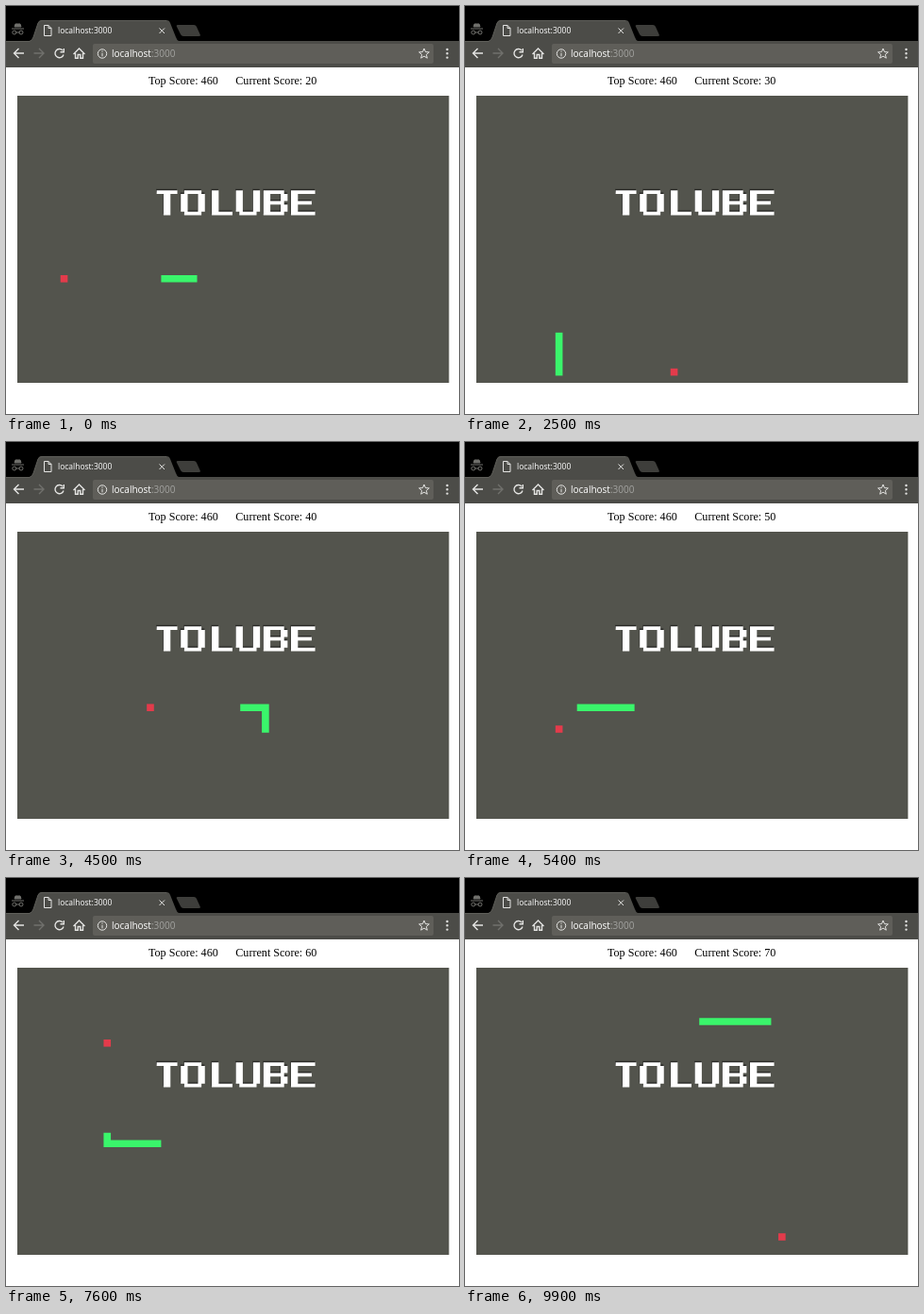
Animation, 480 px wide and 432 px high, one loop 10000 ms. Source, as an HTML page:

```html
<!DOCTYPE html>
<html lang="en">
<head>
<meta charset="utf-8">
<title>localhost:3000</title>
<style>
  html, body { margin: 0; width: 100%; height: 100%; overflow: hidden; background: #fff; }
  svg { display: block; }
  .ui { font-family: "Open Sans", "Noto Sans", sans-serif; fill: #fff; }
  .score { font: 12.1px "Liberation Serif", "Times New Roman", serif; }
  .icon { fill: none; stroke: #e4e4e2; stroke-width: 1.4; }
  .thin { stroke-width: 1; }
  .dim { stroke: #70706c; }
</style>
</head>
<body>
<svg width="480" height="432" viewBox="0 0 480 432">
  <!-- browser window -->
  <path d="M0 0H480V38H0z"/>
  <path fill="#4c4c48" d="M0 37H25Q28 36 29 33L34 18Q35 15 38 15H170Q173 15 174 18L180 33Q181 36 183 37H480V65H0z"/>
  <path fill="none" stroke="#5e5e59" d="M0 37.500H25Q28 36 29 33L34 18Q35 15.500 38 15.500H170"/>
  <path fill="#3e3e3b" d="M182 20H199Q201 20 202 22L206 31Q206 32 204 32H188Q186 32 185 30L181 22Q180 20 182 20z"/>
  <rect x="92" y="40" width="361" height="21" rx="2" fill="#5f5e59"/>
  <g class="icon thin dim">
    <path fill="#70706c" d="M9 22L10 19H15L16 22z"/>
    <path d="M6 24H19M10.500 28H14.500"/>
    <circle cx="8.800" cy="28" r="2"/><circle cx="16" cy="28" r="2"/>
  </g>
  <path class="icon thin" d="M40.500 20.500H45L48 23.500V31.500H40.500zM45 20.500V23.500H48"/>
  <path class="icon thin" d="M162.500 23.500L168 29M168 23.500L162.500 29"/>
  <path class="icon" d="M19 50H8.500M13.500 45L8.500 50L13.500 55"/>
  <path class="icon dim" d="M29.500 50H40M35 45L40 50L35 55"/>
  <path class="icon" d="M60 47A4.600 4.600 0 1 0 61 51.500M61.300 45V48.800H57.500"/>
  <path class="icon" d="M71.500 51L77.500 45L83.500 51M73.500 50V55.300H76.200V51.500H78.800V55.300H81.500V50"/>
  <g class="icon thin">
    <circle cx="102" cy="50.500" r="4.700"/>
    <path d="M102 49.800V53.300M102 47.500V48.700"/>
    <path d="M443 45L444.500 48.600L448.400 48.900L445.400 51.400L446.300 55.200L443 53.100L439.700 55.200L440.600 51.400L437.600 48.900L441.500 48.600z"/>
  </g>
  <path stroke="#e4e4e2" stroke-width="2.400" stroke-linecap="round" stroke-dasharray="0 4.300" d="M467.500 46V55"/>
  <text class="ui" x="55" y="29" font-size="8.500">localhost:3000</text>
  <text class="ui" x="112" y="54" font-size="10">localhost<tspan fill="#a3a3a0">:3000</tspan></text>

  <!-- game -->
  <text class="score" x="151" y="83">Top Score: 460</text>
  <text class="score" x="243.300" y="83">Current Score: <tspan id="score">20</tspan></text>
  <rect x="12" y="95" width="457.400" height="304" fill="#53544d"/>
  <defs><g id="logo" fill-rule="evenodd"></g></defs>
  <use href="#logo" transform="translate(155.500 193.700) scale(3.650 3.750)" fill="#2b2b28"/>
  <use href="#logo" transform="translate(156 195.200) scale(3.650 3.750)" fill="#fff"/>
  <g transform="translate(12 95) scale(7.620 7.600)">
    <rect id="food" width="1" height="1" fill="#e33b4b"/>
    <path id="snake" fill="none" stroke="#3af56b" stroke-linecap="square"/>
  </g>
</svg>
<script>
const $ = id => document.getElementById(id);

const glyphs = {
  T: 'M1 0h6v1h-2v6h-2v-6h-2z',
  O: 'M1 0h5v1h1v5h-1v1h-5v-1h-1v-5h1zM2 1v5h3v-5z',
  L: 'M1 0h2v6h4v1h-6z',
  U: 'M0 0h2v6h3v-6h2v6h-1v1h-5v-1h-1z',
  B: 'M0 0h6v1h1v2h-1v1h1v2h-1v1h-6zM2 1v2h3v-2zM2 4v2h3v-2z',
  E: 'M0 0h7v1h-5v2h4v1h-4v2h5v1h-7z'
};
$('logo').innerHTML = [...'TOLUBE']
  .map((c, i) => `<path transform="translate(${i * 8})" d="${glyphs[c]}"/>`).join('');

// The player's moves, walked cell by cell from the first tail cell.
const directions = { L: [-1, 0], R: [1, 0], U: [0, -1], D: [0, 1] };
const route = [[24, 25]];
for (const move of 'L19 U8 R6 D21 R23 U14 L32 D3 R18 U3 L8 U17 R28'.split(' ')) {
  const [dx, dy] = directions[move[0]];
  for (let n = +move.slice(1); n--;) {
    const [x, y] = route.at(-1);
    route.push([x + dx, y + dy]);
  }
}

const startLength = 5;
const foods = [[6, 25], [27, 38], [18, 24], [11, 27], [12, 10], [42, 37]];

// Each food is eaten when the head next crosses its cell.
const eatenAt = [];
for (let i = startLength; i < route.length; i++) {
  if (String(route[i]) === String(foods[eatenAt.length])) eatenAt.push(i);
}

// [ms, steps]: close to 50 ms per step, drifting slightly.
const pace = [[0, 0], [3700, 74], [5400, 107], [6800, 136], [8500, 169], [9900, 196]];

function stepsAt(t) {
  const i = Math.max(1, pace.findIndex(([ms]) => ms >= t));
  const [t0, s0] = pace[i - 1], [t1, s1] = pace[i];
  return Math.round(s0 + (s1 - s0) * (t - t0) / (t1 - t0));
}

function draw() {
  const t = Math.floor(performance.now() % 10000 / 100) * 100;
  const head = stepsAt(t) + startLength - 1;
  const eaten = eatenAt.filter(i => i <= head).length;
  const body = route.slice(head + 1 - startLength - eaten, head + 1);
  $('snake').setAttribute('d', 'M' + body.map(([x, y]) => `${x + .5} ${y + .5}`).join('L'));
  const [x, y] = foods[eaten];
  $('food').setAttribute('x', x);
  $('food').setAttribute('y', y);
  $('score').textContent = 20 + 10 * eaten;
  requestAnimationFrame(draw);
}
draw();
</script>
</body>
</html>
```
